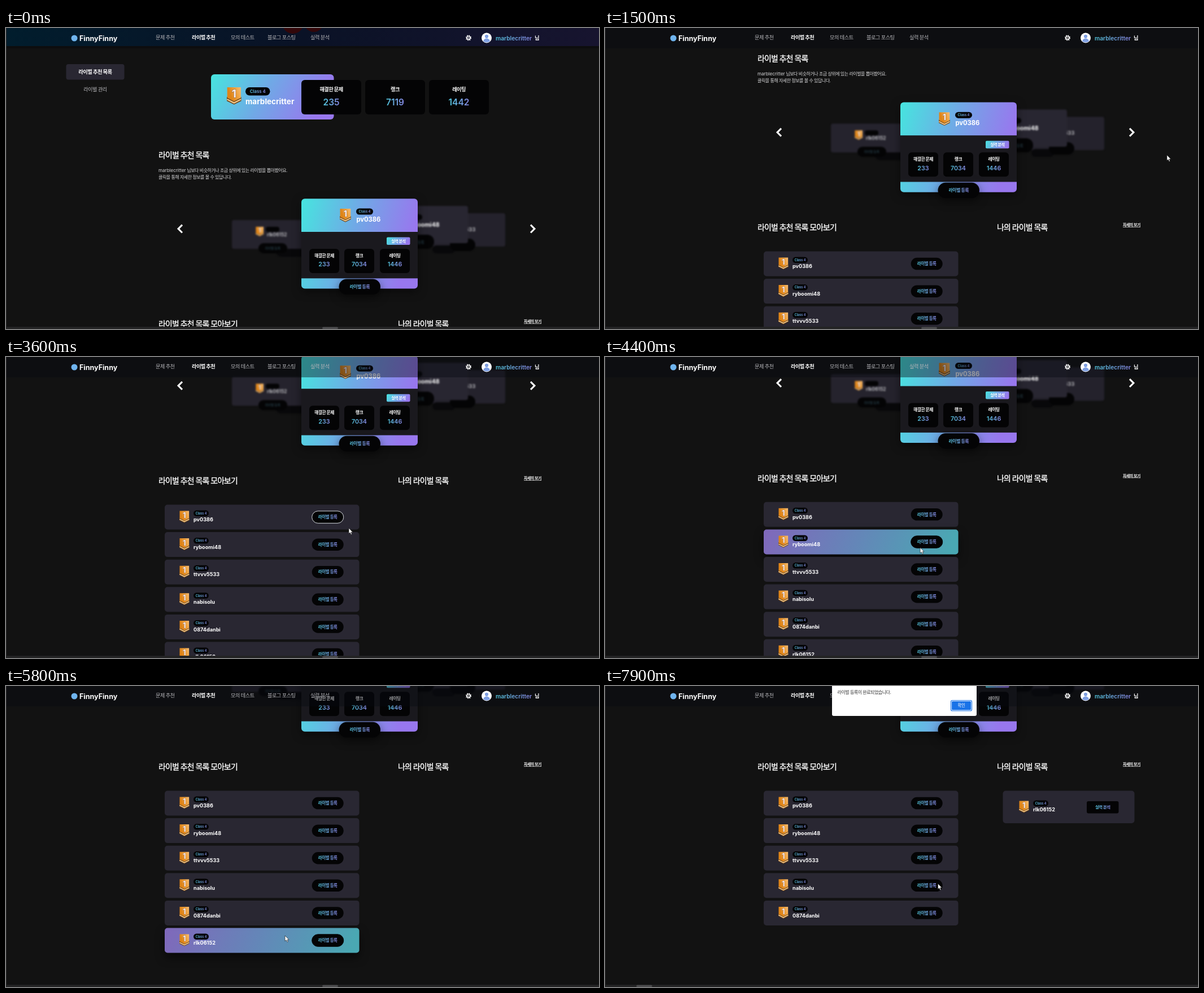
An HTML page that plays this animation: 1050x533 px, repeating every 8 s.

```html
<!DOCTYPE html>
<html lang="ko">
<head>
<meta charset="utf-8">
<title>Rival list</title>
<style>
html, body { margin: 0; width: 100%; height: 100%; overflow: hidden; background: #121212; }
svg { display: block; width: 1050px; height: 533px; }
text { font-family: Inter, 'Noto Sans CJK KR', 'Noto Sans CJK', 'Noto Sans KR', sans-serif; fill: #fff; white-space: pre; }
.m { text-anchor: middle; }
.s { font-weight: 600; }
.h { font-weight: 500; stroke: #fff; stroke-width: .35; }
.b { font-weight: 700; }
.g { fill: url(#tint); }
.p { fill: #d8d8da; }
.dim { fill: #b4b4b8; }
.faint { fill: #2c4854; }
.soft { filter: blur(1.7px); }
.lift { filter: drop-shadow(0 5px 8px rgba(0,0,0,.5)); }
.hot { filter: drop-shadow(0 8px 8px rgba(0,0,0,.55)); }
</style>
</head>
<body>
<svg id="stage" viewBox="0 0 1050 533"></svg>
<script>
const PANEL = '#292732', BLACK = '#040405';
const ROW_TOP = 566.3, ROW_PITCH = 48.6, ROW_H = 44;
const USER = 'marblecritter';
const RIVALS = ['pv0386', 'ryboomi48', 'ttvvv5533', 'nabisolu', '0874danbi', 'rlk06152'];

const rect = (x, y, w, h, r, fill, extra = '') =>
  `<rect x="${x}" y="${y}" width="${w}" height="${h}" rx="${r}" fill="${fill}" ${extra}/>`;

// y is the optical middle of the line; Hangul is set a little tighter
const text = (x, y, size, str, cls = '') =>
  `<text x="${x}" y="${y + size * .364}" font-size="${size}" class="${cls}" letter-spacing="${/[가-힣]/.test(str) ? -.06 * size : 0}">${str}</text>`;

const badge = (x, y, scale) =>
  `<use href="#badge" transform="translate(${x} ${y}) scale(${scale})"/>`;

const pill = (x, y, w, h, size) =>
  rect(x, y, w, h, h / 2, BLACK) + text(x + w / 2, y + h / 2, size, 'Class 4', 'm s g');

const stat = (x, y, w, h, label, value, labelSize, valueSize) =>
  rect(x, y, w, h, 6, BLACK) +
  text(x + w / 2, y + h * .28, labelSize, label, 'm b') +
  text(x + w / 2, y + h * .64, valueSize, value, 'm s g');

const stats = (xs, values, ...box) => ['해결한 문제', '랭크', '레이팅']
  .map((label, i) => stat(xs[i], box[0], box[1], box[2], label, values[i], box[3], box[4])).join('');

const gradient = (id, colors, tilt = 0) =>
  `<linearGradient id="${id}" x1="0" y1="0" x2="1" y2="${tilt}">${colors.map((c, i) =>
    `<stop offset="${i / (colors.length - 1)}" stop-color="${c}"/>`).join('')}</linearGradient>`;

const defs = `<defs>
  ${gradient('brand', ['#46e5df', '#70a9e6', '#9877ee'], .2)}
  ${gradient('hover', ['#8068bb', '#6486b8', '#4aa8b3'], .05)}
  ${gradient('tint', ['#50c6dc', '#8686e2'])}
  ${gradient('bar', ['#011d2d', '#0a1226', '#17142f'])}
  ${gradient('gold', ['#df8417', '#f0a645', '#f7c48a'], -.4)}
  <g id="badge">
    <path d="M0 12V17L9 21.500 18 17V12Z" fill="#6b431b"/>
    <path d="M.5 0H17.500V13L9 17.500 .5 13Z" fill="url(#gold)"/>
    <path d="M.3 15L9 19.500 17.700 15" fill="none" stroke="#f3c888" stroke-width="1.700"/>
    <text x="9" y="13" font-size="13" class="m b" style="fill:#f7eef4;stroke:#a8713c;stroke-width:1;paint-order:stroke">1</text>
  </g></defs>`;

const profile = rect(363, 82, 217.5, 80, 6, 'url(#brand)') + badge(391, 105, 1.42) +
  pill(424, 105, 43.5, 14.500, 7.8) + text(424, 130, 13.500, USER, 'b') +
  stats([523, 636, 749], [235, 7119, 1442], 92, 106, 61, 9.2, 15.5);

const sideCards = `<g class="soft">
  ${rect(640, 328, 244, 59, 4, '#24222c')}${text(814, 357, 9, '533', 'b dim')}
  ${rect(755, 385, 40, 14, 7, '#08080a')}${rect(786, 373, 45, 22, 11, BLACK)}
  ${rect(600, 315, 218, 66, 4, '#282631')}${rect(712, 330, 25, 10, 5, BLACK)}
  ${text(711, 348, 10.500, RIVALS[1], 'b')}${rect(705, 366, 53, 25, 12, BLACK)}${text(728, 379, 7, '등록', 'faint')}
  ${rect(478, 386, 60, 19, 9, '#08080a')}
  ${rect(400, 340, 200, 51, 4, '#25232d')}${badge(442, 352, .8)}${rect(460, 352, 24, 9, 4, BLACK)}
  ${text(462, 366, 8.3, RIVALS[5], 'b dim')}${rect(447, 381, 51, 18, 9, BLACK)}${text(472, 390, 6, '라이벌 등록', 'm faint')}</g>`;

const mainCard = `<g class="lift">${rect(523, 302.3, 206, 159.2, 6, 'url(#brand)')}</g>` +
  rect(523, 361, 206, 82.300, 0, '#1a191e') + badge(591, 320, 1.1) +
  pill(620, 319.5, 30, 11, 5.8) + text(620.5, 339, 11.200, RIVALS[0], 'b') +
  rect(674, 370.5, 41.5, 13.500, 2, 'url(#brand)') + text(694.8, 377.3, 7, '실력 분석', 'm b') +
  stats([537, 599, 662], [233, 7034, 1446], 391, 53, 43, 7.8, 10.700) +
  `<g class="lift">${rect(589.5, 444.5, 73.5, 27.500, 13.700, BLACK)}</g>` + text(626.3, 458.3, 7.9, '라이벌 등록', 'm s g');

const chevron = (x, dir) =>
  `<path d="M${x} 348.800l${-6.8 * dir} 0" stroke="none"/><path d="M${x} 348.700l${6.9 * dir} 6.900l${-6.9 * dir} 6.900" fill="none" stroke="#fff" stroke-width="3.100"/>`;

const person = (x, y, name) => badge(x, y + 11, .98) + pill(x + 25, y + 10, 27, 10.5, 5.5) +
  text(x + 25, y + 26.500, 9.1, name, 'b');

const row = (name, i) => {
  const y = ROW_TOP + i * ROW_PITCH;
  return `<g class="row">${rect(281, y, 344.5, ROW_H, 5, PANEL)}
    ${rect(281, y, 344.5, ROW_H, 5, 'url(#hover)', 'class="hot"')}${person(307, y, name)}
    ${rect(541.7, y + 11.3, 56, 21.500, 10.700, BLACK, 'class="btn"')}${text(569.7, y + 22, 7.5, '라이벌 등록', 'm s g')}</g>`;
};

const page = `<g id="page">
  ${rect(106.5, 64, 103, 27.500, 4, PANEL)}${text(158, 77.5, 9.3, '라이벌 추천 목록', 'm b')}
  ${text(158, 109, 9.2, '라이벌 관리', 'm dim')}${profile}
  ${text(270, 225, 13.900, '라이벌 추천 목록', 'h')}
  ${text(270, 252, 8, `<tspan letter-spacing="0">${USER}</tspan> 님보다 비슷하거나 조금 상위에 있는 라이벌을 뽑아봤어요.`, 'p')}
  ${text(270, 264, 8, '클릭을 통해 자세한 정보를 볼 수 있답니다.', 'p')}
  ${sideCards}${mainCard}${chevron(312, -1)}${chevron(929, 1)}
  ${text(270, 524, 13.900, '라이벌 추천 목록 모아보기', 'h')}${text(694, 524, 13.900, '나의 라이벌 목록', 'h')}
  ${text(917, 519.5, 6.9, '자세히 보기', 'b')}${rect(917, 523, 31, .7, 0, '#fff')}
  ${RIVALS.map(row).join('')}
  <g id="mine">${rect(704.5, ROW_TOP, 233, 57.500, 5, PANEL)}${person(733, ROW_TOP + 7, RIVALS[5])}
  ${rect(853, ROW_TOP + 18.500, 56.5, 21.500, 3, BLACK)}${text(881.3, ROW_TOP + 29, 7.4, '실력 분석', 'm s g')}</g></g>`;

const gear = `<g transform="translate(819 17.500)" fill="none" stroke="#fff">
  <circle r="3" stroke-width="1.700"/><circle r="4.300" stroke-width="1.500" stroke-dasharray="1.690"/><circle r="1" fill="#fff" stroke="none"/></g>`;

const avatar = `<circle cx="851" cy="17.500" r="9" fill="#fff"/><circle cx="851" cy="14.800" r="3.100" fill="#7f9fe2"/>
  <path d="M845.200 23.500a5.800 5 0 0 1 11.600 0a9 9 0 0 1-11.600 0Z" fill="#7f9fe2"/>`;

const header = `<g id="top">${rect(0, 0, 1050, 36, 0, '#0d0d0e')}${rect(0, 0, 1050, 32, 0, 'url(#bar)')}</g>
  ${rect(0, 0, 1050, 36, 0, 'rgba(9,11,17,.42)', 'id="glass"')}
  <g id="blobs" fill="#32070a"><circle cx="508" cy="-9" r="19"/><circle cx="545" cy="-10" r="17"/></g>
  <circle cx="121" cy="18" r="5.500" fill="#6fb4ee"/>${text(130, 18, 12.500, 'FinnyFinny', 'b')}
  ${text(265, 17, 9.2, '문제 추천', 'dim')}${text(329, 17, 9.2, '라이벌 추천', 'b')}${text(398, 17, 9.2, '모의 테스트', 'dim')}
  ${text(463, 17, 9.2, '블로그 포스팅', 'dim')}${text(539, 17, 9.2, '실력 분석', 'dim')}
  ${gear}${avatar}${text(867, 18, 10.200, USER, 's g')}${text(936, 18, 9.3, '님', 'b')}`;

const alertBox = `<g id="alert">${rect(402, -6, 256, 59, 3, '#fff')}${text(411.5, 11, 8, '라이벌 등록이 완료되었습니다.').replace('<text', '<text style="fill:#333"')}
  ${rect(612.5, 25.500, 37, 18.500, 2.500, '#fff', 'stroke="#1a73e8" stroke-width="1.200"')}
  ${rect(614, 27, 34, 15.500, 1.500, '#1a73e8')}${text(631, 34.700, 7.5, '확인', 'm')}</g>`;

const cursor = `<g id="cursor" stroke="#111" stroke-width=".6" fill="#fff">
  <path id="arrow" d="M0 0V9.800L2.300 7.800 3.900 11.400 5.500 10.700 4 7.200H7Z"/>
  <path id="hand" d="M-1 0Q0-1 1 0V4.500L5 5.500Q6 6 5.500 8L4.500 13H-1.500L-4.500 8Q-4 6.500-2.500 7.500L-1 9Z"/></g>`;

stage.innerHTML = defs + page + header + rect(0, 0, 1, 529, 0, '#2a2a2c') +
  rect(0, 529, 1050, 4, 0, '#232324') + rect(560, 529.5, 28, 3.500, 2, '#4c4c4e', 'id="thumb"') + alertBox + cursor;

const $ = id => document.getElementById(id);
const rows = [...document.querySelectorAll('.row')].map(el =>
  ({ el, hot: el.querySelector('.hot'), btn: el.querySelector('.btn') }));

const clamp = v => Math.min(1, Math.max(0, v));
const ramp = (t, from, to) => { const p = clamp((t - from) / (to - from)); return p * p * (3 - 2 * p); };
const show = (el, on) => el.setAttribute('opacity', +on);
const move = (el, x, y) => el.setAttribute('transform', `translate(${x} ${y})`);

// time, x, y of the pointer tip
const PATH = [[900, 985, 330], [1400, 995, 225], [1500, 995, 225], [2100, 644, 150], [2450, 644, 150],
  [2950, 578, 285], [3500, 578, 285], [3600, 607, 303], [4200, 560, 338], [4350, 560, 338],
  [4900, 481, 319], [5200, 484, 345], [5350, 484, 345], [5600, 490, 398], [5700, 490, 398],
  [5800, 494, 442], [5860, 494, 442], [6200, 515, 205], [6600, 572, 444], [6800, 570.5, 445],
  [7500, 570, 443], [7680, 586, 427], [7800, 586, 427], [7900, 589.5, 350]];

function pointerAt(t) {
  const n = PATH.findIndex(k => k[0] > t);
  if (n <= 0) return PATH[n ? PATH.length - 1 : 0].slice(1);
  const a = PATH[n - 1], b = PATH[n], p = ramp(t, a[0], b[0]);
  return [a[1] + (b[1] - a[1]) * p, a[2] + (b[2] - a[2]) * p];
}

function draw(t) {
  const scroll = 170.8 * ramp(t, 530, 1250) + 134 * ramp(t, 1510, 2080) + 76 * ramp(t, 4330, 4800);
  const [x, y] = pointerAt(t);
  const added = t >= 7200;
  const focus = [ramp(t, 2800, 2950) - ramp(t, 3560, 3760), 0, 0, 0, 0, ramp(t, 6600, 6800)];
  const onButton = (t > 2850 && t < 3550) || (t > 6600 && !added);

  move($('page'), 0, -scroll);
  show($('top'), 1 - ramp(t, 550, 900));
  show($('glass'), ramp(t, 550, 900));
  show($('blobs'), t < 600);
  rows.forEach(({ el, hot, btn }, i) => {
    const dy = y + scroll - ROW_TOP - i * ROW_PITCH;
    const hovered = !added && t > 2000 && x > 281 && x < 625 && dy > 0 && dy < 40;
    show(hot, hovered);
    btn.setAttribute('stroke', focus[i] > 0 ? `rgba(235,240,245,${focus[i]})` : hovered ? BLACK : 'none');
    show(el, i < 5 || !added);
  });
  show($('mine'), added);
  show($('alert'), ramp(t, 7250, 7450));
  $('thumb').setAttribute('x', added ? 55.5 : 560);
  move($('cursor'), x, y);
  show($('cursor'), t >= 900);
  show($('arrow'), !onButton);
  show($('hand'), onButton);
}

const start = performance.now();
(function tick() {
  draw((performance.now() - start) % 8000);
  requestAnimationFrame(tick);
})();
</script>
</body>
</html>
```
